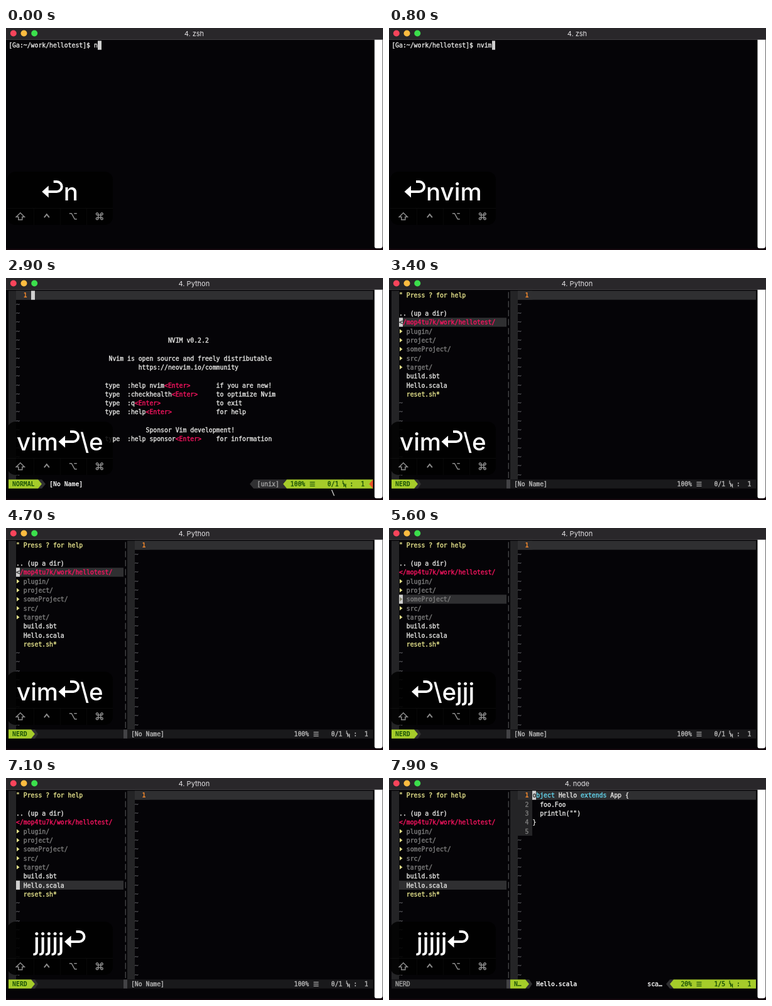
These frames come from a looping animation (600x354 px, 8 s). An HTML page with a canvas:

```html
<!DOCTYPE html>
<html lang="en">
<head>
<meta charset="utf-8">
<title>Terminal session</title>
<style>
  html, body { margin: 0; width: 100%; height: 100%; overflow: hidden; background: #050407; }
  canvas { display: block; }
</style>
</head>
<body>
<canvas id="stage" width="600" height="354"></canvas>
<script>
const ctx = document.getElementById('stage').getContext('2d');

const LOOP = 8000;
const CELL = 5.9, LINE = 14.33, LEFT = 4.2, TOP = 20.4, COLS = 98.2;
const STATUS = 21;
const MONO = '"DejaVu Sans Mono", monospace';
const SANS = 'Inter, sans-serif';
const C = {
  bg: '#050407', text: '#e2e2e0', bright: '#f4f4f4', dim: '#7c7c7c', tilde: '#505054',
  gutter: '#242426', line: '#2f2f31', bar: '#19191b', segment: '#303032', cursor: '#cfcfcf',
  lime: '#a5cc2a', green: '#1c5308', pink: '#f5145f', yellow: '#e3e08a',
  orange: '#f78a2c', cyan: '#62d3ea'
};

// Keystrokes with their times; the overlay keeps the last six.
const KEYS = [
  [0, '↩'], [0, 'n'], [500, 'v'], [600, 'i'], [700, 'm'], [1500, '↩'],
  [2800, '\\'], [2900, 'e'],
  [5000, 'j'], [5200, 'j'], [5500, 'j'], [5800, 'j'], [6000, 'j'], [6200, 'j'],
  [6700, 'j'], [7000, '↩']
];
const CLEAR = 1700, EDITOR = 2100, PYTHON = 2200, TREE = 3000, OPEN = 7200, NODE = 7500;

const ROOT = '</mop4tu7k/work/hellotest/';
const DIRS = ['plugin/', 'project/', 'someProject/', 'src/', 'target/'];
const CODE = ['object Hello extends App {', '  foo.Foo', '  println("")', '}', ''];

const colX = col => LEFT + col * CELL;
const rowY = row => TOP + row * LINE;

function rect(x, y, w, h, color) {
  ctx.fillStyle = color;
  ctx.fillRect(x, y, w, h);
}

function cells(col, row, count, color, rows = 1) {
  const x = Math.round(colX(col));
  rect(x, rowY(row), Math.round(colX(col + count)) - x, rows * LINE, color);
}

function put(col, row, text, color = C.text, bold = false) {
  ctx.font = `${bold ? 'bold ' : ''}9.8px ${MONO}`;
  ctx.textAlign = 'left';
  ctx.textBaseline = 'alphabetic';
  ctx.fillStyle = ctx.strokeStyle = color;
  ctx.lineWidth = 0.4;
  [...text].forEach((ch, i) => {
    if (ch === ' ') return;
    ctx.fillText(ch, colX(col + i), rowY(row) + 10.8);
    if (!bold) ctx.strokeText(ch, colX(col + i), rowY(row) + 10.8);
  });
}

function polygon(points, color) {
  ctx.fillStyle = color;
  ctx.beginPath();
  points.forEach(([x, y]) => ctx.lineTo(x, y));
  ctx.fill();
}

// Powerline tip filling one cell of the status row.
function tip(col, color, toRight = true) {
  const x1 = Math.round(colX(col)), x2 = Math.round(colX(col + 1)), y = rowY(STATUS);
  const [base, point] = toRight ? [x1, x2] : [x2, x1];
  polygon([[base, y], [point, y + LINE / 2], [base, y + LINE]], color);
}

function cursor(col, row, ch = '') {
  cells(col, row, 1, C.cursor);
  put(col, row, ch, '#333');
}

function dot(x, y, r, color) {
  ctx.fillStyle = color;
  ctx.beginPath();
  ctx.arc(x, y, r, 0, Math.PI * 2);
  ctx.fill();
}

function drawWindow(title) {
  rect(0, 0, 600, 354, '#16080e');
  ctx.fillStyle = C.bg;
  ctx.beginPath();
  ctx.roundRect(0, 0, 600, 352, [0, 0, 4, 4]);
  ctx.fill();
  rect(0, 0, 600, 18, '#29272a');
  rect(0, 18, 600, 1, '#3f3d40');
  ['#f8445b', '#fdbc40', '#3bdf4c'].forEach((color, i) => dot(11.8 + i * 16.7, 8.5, 5, color));
  ctx.fillStyle = '#fff';
  ctx.beginPath();
  ctx.roundRect(586.5, 18.7, 12.9, 332.6, [0, 0, 4, 3]);
  ctx.fill();
  ctx.font = `11px ${SANS}`;
  ctx.textAlign = 'center';
  ctx.textBaseline = 'alphabetic';
  ctx.fillStyle = '#e4e3e5';
  ctx.fillText(title, 299.4, 12.8);
}

function drawShell(t) {
  if (t >= CLEAR) return;
  const typed = KEYS.filter(([at, key]) => at <= t && key !== '↩').map(k => k[1]).join('');
  const prompt = '[Ga:~/work/hellotest]$ ' + typed;
  put(0, 0, prompt);
  if (t < 1500) cursor(prompt.length, 0);
  else cursor(0, 1);
}

// Sign column, numbered lines and tildes of an editing window.
function drawBuffer(col, lines) {
  cells(col, 0, 2, C.gutter, STATUS);
  cells(col + 2, 0, 4, C.gutter, lines);
  cells(col + 2, 0, COLS - col - 2, C.line);
  for (let row = 0; row < STATUS; row++) {
    if (row < lines) put(col + 4, row, String(row + 1), row ? C.dim : C.orange, !row);
    else put(col + 2, row, '~', C.tilde);
  }
}

function drawWelcome() {
  put(43, 5, 'NVIM v0.2.2');
  put(27, 7, 'Nvim is open source and freely distributable');
  put(35, 8, 'https://neovim.io/community');
  put(37, 15, 'Sponsor Vim development!');
  [
    [10, ':help nvim', 'if you are new!'],
    [11, ':checkhealth', 'to optimize Nvim'],
    [12, ':q', 'to exit'],
    [13, ':help', 'for help'],
    [16, ':help sponsor', 'for information']
  ].forEach(([row, command, purpose]) => {
    put(26, row, 'type  ' + command);
    put(32 + command.length, row, '<Enter>', C.pink);
    put(56, row, purpose);
  });
}

function drawPosition(col, percent, place, color) {
  put(col, STATUS, percent.padStart(4), color);
  const x = colX(col + 5) + 1.5, y = Math.round(rowY(STATUS));
  for (let i = 0; i < 3; i++) rect(x, y + 4 + i * 3, 8, 1.2, color);
  put(col + 10, STATUS, place, color);
  // Line-number symbol: a small L over an N.
  const lx = colX(col + 14);
  ctx.strokeStyle = color;
  ctx.lineWidth = 1.2;
  ctx.stroke(new Path2D(`M${lx + 1} ${y + 2}v5h2.5M${lx + 2.5} ${y + 12}v-5l3 5v-5`));
  put(col + 16, STATUS, ':', color);
  put(col + 19, STATUS, '1', color);
}

function modeSegment(col, width, label) {
  cells(col, STATUS, width, C.lime);
  cells(col + width, STATUS, 1, C.segment);
  tip(col + width, C.lime);
  tip(col + width + 1, C.segment);
  put(col + 1, STATUS, label, C.green, true);
}

// Lime block at the right end, led in by a tip from the grey segment.
function positionSegment(col) {
  cells(col, STATUS, 1, C.segment);
  tip(col, C.lime, false);
  cells(col + 1, STATUS, COLS - col - 1, C.lime);
}

function drawStart(t) {
  drawBuffer(0, 1);
  cursor(6, 0);
  drawWelcome();
  modeSegment(0, 8, 'NORMAL');
  put(11, STATUS, '[No Name]', C.bright, true);
  tip(65, C.segment, false);
  cells(66, STATUS, 8, C.segment);
  put(67, STATUS, '[unix]', '#a0a0a0');
  positionSegment(74);
  tip(COLS - 1, '#e8502a', false);
  drawPosition(76, '100%', '0/1', C.green);
  if (t >= 2800) put(87, 22, '\\');
}

function drawTree(selected, focused) {
  cells(0, 0, 2, C.gutter, STATUS);
  cells(2, selected, 29, C.line);
  put(2, 0, '" Press ? for help', C.yellow);
  put(2, 2, '.. (up a dir)');
  put(2, 3, ROOT, C.pink);
  const arrow = (row, color) => {
    const x = colX(2) + 1, y = rowY(row) + 7.2;
    polygon([[x, y - 3.5], [x + 4.5, y], [x, y + 3.5]], color);
  };
  DIRS.forEach((name, i) => {
    arrow(4 + i, C.yellow);
    put(4, 4 + i, name, C.dim);
  });
  put(4, 9, 'build.sbt');
  put(4, 10, 'Hello.scala');
  put(4, 11, 'reset.sh*', C.yellow);
  for (let row = 12; row < STATUS; row++) put(2, row, '~', C.tilde);
  for (let row = 0; row < STATUS; row++) rect(colX(31) + 2.6, rowY(row) + 2, 1, 10, '#5c5c5f');
  if (focused) {
    cursor(2, selected, selected === 3 ? '<' : '');
    if (selected > 3 && selected < 9) arrow(selected, '#8a8a70');
  }
}

function drawSplit(jumps, opened) {
  drawBuffer(32, opened ? CODE.length : 1);
  drawTree(3 + jumps, !opened);
  cells(0, STATUS, 31, C.bar);
  cells(31, STATUS, 1, '#424245');
  if (!opened) {
    modeSegment(0, 6, 'NERD');
    cells(32, STATUS, COLS - 32, C.bar);
    put(33, STATUS, '[No Name]', '#b4b4b4');
    drawPosition(77, '100%', '0/1', '#b4b4b4');
    return;
  }
  CODE.forEach((line, row) => put(38, row, line));
  cells(38, 0, 6, C.line);
  put(38, 0, 'object', C.cyan);
  cells(51, 0, 7, C.line);
  put(51, 0, 'extends', C.cyan);
  cursor(38, 0, 'o');
  put(1, STATUS, 'NERD', '#a0a0a0');
  modeSegment(32, 4, 'N…');
  put(39, STATUS, 'Hello.scala', C.bright, true);
  put(69, STATUS, 'sca…', C.bright);
  tip(74, C.segment, false);
  positionSegment(75);
  drawPosition(77, '20%', '1/5', C.green);
}

function returnKey(x) {
  polygon([[x + 0.5, 261], [x + 11, 251.5], [x + 11, 270.5]], '#fff');
  ctx.strokeStyle = '#fff';
  ctx.lineWidth = 4;
  ctx.beginPath();
  ctx.moveTo(x + 10, 261);
  ctx.lineTo(x + 24, 261);
  ctx.arc(x + 24, 253, 8, Math.PI / 2, -Math.PI / 2, true);
  ctx.lineTo(x + 19, 245);
  ctx.stroke();
}

const loops = [[-1, -1], [1, -1], [1, 1], [-1, 1]]
  .map(([sx, sy]) => `M${sx * 3.7 - 1.7} ${sy * 3.7}a1.7 1.7 0 1 0 3.4 0a1.7 1.7 0 1 0-3.4 0`).join('');
const MODIFIERS = [
  'M0-5.5L6.5 1H3V5.5H-3V1H-6.5Z',
  'M-4 2L0-3L4 2',
  'M-6-4.5H-2.5L2.5 4.5H6M1.5-4.5H6',
  'M-2-3.7V3.7M2-3.7V3.7M-3.7-2H3.7M-3.7 2H3.7' + loops
].map(d => new Path2D(d));

function drawKeys(t) {
  ctx.fillStyle = 'rgba(0,0,0,.87)';
  ctx.beginPath();
  ctx.roundRect(2, 229, 168, 85, 13);
  ctx.fill();
  rect(2, 287, 168, 1, 'rgba(255,255,255,.045)');
  MODIFIERS.forEach((icon, i) => {
    if (i) rect(2 + i * 42, 288, 1, 26, 'rgba(255,255,255,.03)');
    ctx.save();
    ctx.translate(22.8 + i * 42, 300.2);
    ctx.strokeStyle = '#8b8b8b';
    ctx.lineWidth = i === 1 ? 2 : 1.5;
    ctx.stroke(icon);
    ctx.restore();
  });

  const keys = KEYS.filter(([at]) => at <= t).slice(-6).map(k => k[1]);
  const runs = keys.join('').split(/(↩)/).filter(Boolean);
  ctx.font = `500 38.5px ${SANS}`;
  ctx.textAlign = 'left';
  ctx.textBaseline = 'alphabetic';
  const widths = runs.map(run => run === '↩' ? 35 : ctx.measureText(run).width);
  let x = 85.8 - widths.reduce((a, b) => a + b) / 2;
  runs.forEach((run, i) => {
    if (run === '↩') returnKey(x);
    else {
      ctx.fillStyle = '#fff';
      ctx.fillText(run, x, 274.5);
    }
    x += widths[i];
  });
}

function draw(t) {
  const jumps = KEYS.filter(([at, key]) => key === 'j' && at <= t).length;
  drawWindow(t < PYTHON ? '4. zsh' : t < NODE ? '4. Python' : '4. node');
  if (t < EDITOR) drawShell(t);
  else if (t < TREE) drawStart(t);
  else drawSplit(jumps, t >= OPEN);
  drawKeys(t);
}

function frame() {
  draw(performance.now() % LOOP);
  requestAnimationFrame(frame);
}
frame();
</script>
</body>
</html>
```
